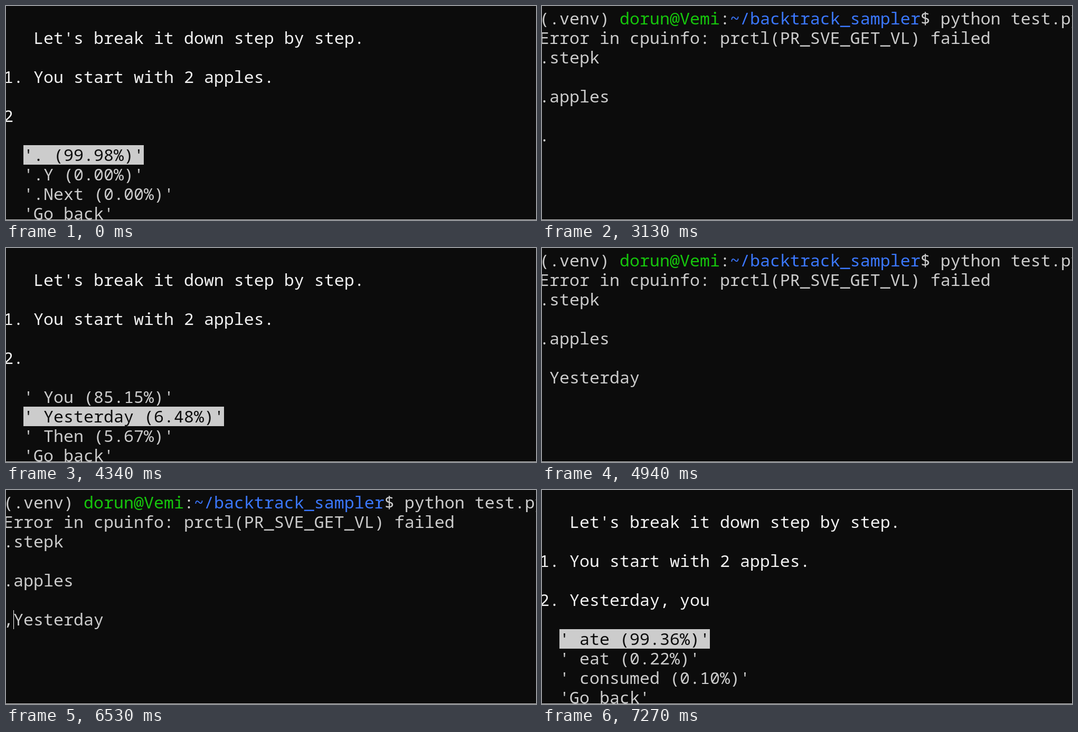
These frames come from a looping animation (1004 px wide and 406 px high, 8 s). An HTML page:

```html
<!DOCTYPE html>
<html lang="en">
<head>
<meta charset="utf-8">
<title>Terminal menu</title>
<style>
  html, body { margin: 0; width: 100%; height: 100%; overflow: hidden; background: #0c0c0c; }
  .stage { position: absolute; left: 0; top: 0; width: 1004px; height: 406px; overflow: hidden; background: #0c0c0c; }
  .stage * { position: absolute; }

  /* Character cells are 19 by 37 px; row 0 starts at y = 5. */
  pre {
    left: -5px; top: calc(4px + var(--row, 0) * 37px); margin: 0;
    font: 31.667px/37px "Noto Sans Mono", "DejaVu Sans Mono", monospace;
    font-variant-ligatures: none; color: #ccc; white-space: pre;
  }
  .stage pre * { position: static; font-weight: 400; }
  b { color: #f2f2f2; }
  mark { color: #0c0c0c; background: none; }
  .user { color: #16c60c; }
  .path { color: #3b78ff; }
  .bar { left: 33px; top: calc(5px + var(--row) * 37px); width: calc(var(--chars) * 19px); height: 37px; background: #ccc; }
  .caret { left: 14px; top: 228px; width: 1px; height: 36px; background: #fff; }
  .edge { left: 0; top: 405px; width: 1004px; height: 1px; background: #ccc; }

  .timed { animation: 8s step-end infinite; opacity: 0; }
  .menu { animation-name: menu; }
  .console { animation-name: console; }
  .dot { animation-name: dot; }
  .you { animation-name: you; }
  .yesterday { animation-name: yesterday; }
  .word { animation-name: word; }
  .comma { animation-name: comma; }
  .comma-menu { animation-name: comma-menu; }
  .comma-word { animation-name: comma-word; }
  .ate { animation-name: ate; }
  .caret { animation-name: caret; }
  .click { left: 886px; top: 315px; width: 48px; height: 48px; border-radius: 50%; background: rgba(255, 255, 0, .47); animation-name: click; }
  .pointer { left: 0; top: 0; width: 26px; height: 40px; overflow: visible; animation-name: pointer; }

  @keyframes menu {
    0%, 45%, 62.625%, 90.875% { opacity: 1; }
    39.125%, 61.75%, 81.625% { opacity: 0; }
    100% { opacity: 1; }
  }
  @keyframes console {
    0%, 45%, 62.625%, 90.875%, 100% { opacity: 0; }
    39.125%, 61.75%, 81.625% { opacity: 1; }
  }
  @keyframes dot { 0% { opacity: 1; } 39.125%, 100% { opacity: 0; } }
  @keyframes you { 0%, 54.25%, 100% { opacity: 0; } 45% { opacity: 1; } }
  @keyframes yesterday { 0%, 61.75%, 100% { opacity: 0; } 54.25% { opacity: 1; } }
  @keyframes word { 0%, 45%, 100% { opacity: 0; } 39.125% { opacity: 1; } }
  @keyframes comma { 0%, 62.625%, 100% { opacity: 0; } 61.75% { opacity: 1; } }
  @keyframes comma-menu { 0%, 81.625%, 100% { opacity: 0; } 62.625% { opacity: 1; } }
  @keyframes comma-word { 0%, 90.875%, 100% { opacity: 0; } 81.625% { opacity: 1; } }
  @keyframes ate { 0% { opacity: 0; } 90.875%, 100% { opacity: 1; } }
  @keyframes caret {
    0%, 45%, 82.5%, 90.875%, 100% { opacity: 0; }
    44.25%, 81.625%, 90% { opacity: 1; }
  }
  @keyframes click { 0%, 10.125%, 100% { opacity: 0; } 9.25% { opacity: 1; } }
  @keyframes pointer {
    0% { opacity: 0; transform: translate(919px, 410px); }
    .875% { opacity: 1; transform: translate(919px, 388px); }
    1.75% { opacity: 1; transform: translate(917px, 366px); }
    2.5% { opacity: 1; transform: translate(914px, 352px); }
    3.375% { opacity: 1; transform: translate(912px, 344px); }
    4.25% { opacity: 1; transform: translate(911px, 341px); }
    14.25% { opacity: 1; transform: translate(920px, 340px); }
    15.125% { opacity: 1; transform: translate(927px, 340px); }
    39.125%, 100% { opacity: 0; transform: translate(927px, 340px); }
  }
</style>
</head>
<body>
<div class="stage">
  <div class="timed menu">
    <pre style="--row:1"><b>   Let's break it down step by step.

1. You start with 2 apples.</b></pre>
    <pre style="--row:10">  'Go back'</pre>
  </div>

  <div class="timed dot">
    <i class="bar" style="--row:7; --chars:12"></i>
    <pre style="--row:5"><b>2</b>

  <mark>'. (99.98%)'</mark>
  '.Y (0.00%)'
  '.Next (0.00%)'</pre>
  </div>

  <div class="timed you">
    <i class="bar" style="--row:7; --chars:15"></i>
    <pre style="--row:5"><b>2.</b>

  <mark>' You (85.15%)'</mark>
  ' Yesterday (6.48%)'
  ' Then (5.67%)'</pre>
  </div>

  <div class="timed yesterday">
    <i class="bar" style="--row:8; --chars:20"></i>
    <pre style="--row:5"><b>2.</b>

  ' You (85.15%)'
  <mark>' Yesterday (6.48%)'</mark>
  ' Then (5.67%)'</pre>
  </div>

  <div class="timed comma-menu">
    <i class="bar" style="--row:7; --chars:12"></i>
    <pre style="--row:5"><b>2. Yesterday</b>

  <mark>', (99.12%)'</mark>
  ' you (0.66%)'
  ' ( (0.10%)'</pre>
  </div>

  <div class="timed ate">
    <i class="bar" style="--row:7; --chars:15"></i>
    <pre style="--row:5"><b>2. Yesterday, you</b>

  <mark>' ate (99.36%)'</mark>
  ' eat (0.22%)'
  ' consumed (0.10%)'</pre>
  </div>

  <pre class="timed console">(.venv) <span class="user">dorun@Vemi</span>:<span class="path">~/backtrack_sampler</span>$ python test.py
Error in cpuinfo: prctl(PR_SVE_GET_VL) failed
.stepk

.apples</pre>
  <pre class="timed word" style="--row:6">.</pre>
  <pre class="timed comma" style="--row:6"> Yesterday</pre>
  <pre class="timed comma-word" style="--row:6">,Yesterday</pre>
  <i class="timed caret"></i>

  <i class="edge"></i>
  <svg class="timed pointer"><path d="M0 0V32L7 25.5 12 36 17 33.5 12.5 23.5 23 23Z" fill="#fff"/></svg>
  <i class="timed click"></i>
</div>
</body>
</html>
```
